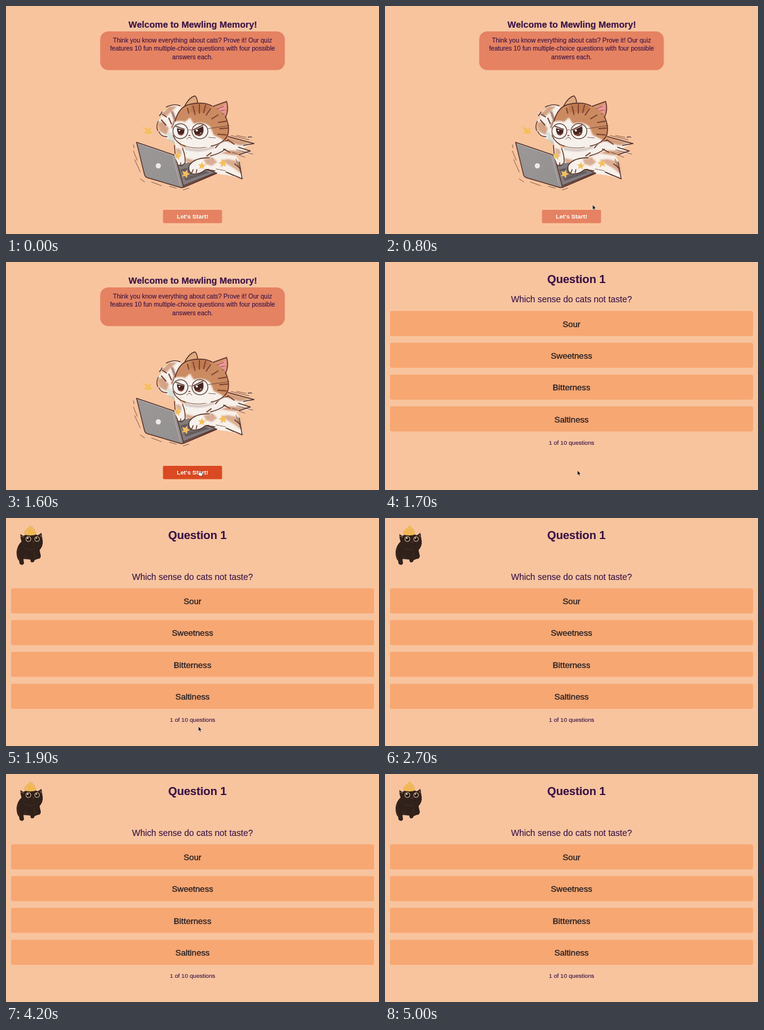
An HTML page that plays this animation: 600 px wide and 368 px high, repeating every 5.1 s.

```html
<!DOCTYPE html>
<html lang="en">
<head>
<meta charset="utf-8">
<title>Cat quiz</title>
<style>
html, body { margin: 0; width: 100%; height: 100%; overflow: hidden; background: #f8c49e; }
svg { display: block; width: 100%; height: 100%; }
text { font-family: "Liberation Sans", Arial, sans-serif; text-anchor: middle; stroke-linejoin: round; fill: #3b1547; stroke: #3b1547; stroke-width: .12; }
.bold { font-weight: 700; stroke-width: .2; }
.answer { font-size: 13.6px; fill: #262024; stroke: #262024; stroke-width: .35; }
.ink { fill: none; stroke: #5a342b; stroke-width: 1.4; stroke-linecap: round; stroke-linejoin: round; }
.thin { stroke-width: .7; }
.stripe { fill: none; stroke: #7d4632; stroke-width: 1.9; stroke-linecap: round; }
.fur { fill: #c98a65; }
.white { fill: #f8f1eb; }
.star { fill: #f5c05c; }
</style>
</head>
<body>
<svg viewBox="0 0 600 368" preserveAspectRatio="none">
<defs>
  <linearGradient id="lid" x1="0" y1="0" x2="1" y2="1">
    <stop offset="0" stop-color="#9b9897"/><stop offset="1" stop-color="#939090"/>
  </linearGradient>
  <filter id="soft"><feGaussianBlur stdDeviation="1.1"/></filter>
  <clipPath id="skull">
    <path d="M271 188Q275 165 295 158Q316 152 334 162Q354 171 358 191Q362 214 348 221Q326 232 298 229Q275 225 269 211Q266 199 271 188Z"/>
  </clipPath>
</defs>
<rect width="600" height="368" fill="#f8c49e"/>

<g id="welcome">
  <text class="bold" x="300.5" y="34.5" font-size="14.5">Welcome to Mewling Memory!</text>
  <rect x="151.5" y="41" width="297" height="62.5" rx="13" fill="#e58261"/>
  <g font-size="10.15">
    <text x="300" y="58.7">Think you know everything about cats? Prove it! Our quiz</text>
    <text x="300" y="72.2">features 10 fun multiple-choice questions with four possible</text>
    <text x="300" y="85.7">answers each.</text>
  </g>

  <g id="typist">
    <!-- raised paw -->
    <path class="white" d="M274 218Q250 214 246 202L248 192L243 187L250 180L246 173L256 168L262 161Q274 157 282 163L273 187Z"/>
    <g filter="url(#soft)">
      <path class="fur" d="M246 176L256 169L262 162L275 162L266 170L258 178ZM245 187L255 188L262 198L258 208L247 202Z" opacity=".75"/>
      <path fill="#b9cbc6" opacity=".5" d="M259 202L272 209L274 224L262 219Z"/>
      <path d="M267 170L272 184L267 197" fill="none" stroke="#8e5b48" stroke-width="3"/>
    </g>
    <path class="stripe" d="M250 184L257 192M252 175L258 179M262 181L266 190"/>
    <path class="ink" d="M246 203Q250 211 259 211M245 186Q241 194 244 201M247 177L251 171M258 163Q270 157 280 161"/>

    <!-- body and swinging arm -->
    <path class="white" d="M271 215L284 230L350 214L385 218L397 222L381 230L394 237L370 242L377 252L381 279Q352 271 337 271L291 260Q274 246 271 215Z"/>
    <g filter="url(#soft)">
      <path class="fur" d="M348 210L365 214L386 219L395 221L377 225L362 221L347 216ZM360 233L391 235L369 241L347 238L329 243Z" opacity=".8"/>
      <path class="fur" d="M287 245L308 250L327 243L334 247L313 257L293 257ZM345 249L357 247L377 251L380 272L367 262Z" opacity=".65"/>
      <path d="M288 230Q314 237 335 227" fill="none" stroke="#d3c7c2" stroke-width="4"/>
    </g>
    <path class="stripe" d="M357 216L367 223M350 231L360 236M368 255L377 262M323 242L330 237"/>
    <path class="ink" d="M350 206L355 210L384 218L399 222L382 225M374 228L393 234L375 240M337 229Q345 218 357 217M375 252L380 279L354 268M329 242Q344 238 353 231"/>
    <path class="ink thin" d="M362 209L391 216M371 232L397 239M364 236L384 244M370 247L378 270M371 209L386 212M390 211L396 212"/>

    <!-- ears and head -->
    <path d="M286 164Q294 148 303 145Q308 149 309 160Z" fill="#dfaa7f"/>
    <path d="M331 162L355 154Q359 168 353 181Z" fill="#d6936b"/>
    <path d="M336 167L354 158Q355 169 351 177Z" fill="#ee969a"/>
    <g clip-path="url(#skull)">
      <rect x="265" y="150" width="100" height="85" fill="#cb8a60"/>
      <g filter="url(#soft)">
        <path class="white" d="M262 190Q277 183 288 187L296 180L302 190Q318 185 329 195L334 208L350 216L340 236L280 236L262 215Z"/>
        <path d="M297 158Q312 153 330 163L322 172L296 171Z" fill="#bb7346" opacity=".7"/>
      </g>
    </g>
    <path class="stripe" d="M301 162L304 175M311 159L311 173M321 160L318 172M292 165L294 173M329 166L322 176M354 186L342 188M357 197L344 198M354 208L341 207M341 176L331 182"/>
    <path class="ink" d="M287 162Q295 147 304 145Q308 149 308 156M333 162L355 154Q359 168 353 180M272 186Q277 166 291 160Q315 153 331 161M353 178Q360 193 357 207Q351 222 330 226M269 209Q274 222 288 226"/>
    <path class="ink thin" d="M340 166L350 162M346 169L352 168M348 174L351 174M288 226Q304 231 321 228"/>

    <!-- face -->
    <g fill="#fff" fill-opacity=".45" stroke="#6c4f45" stroke-width="1.4">
      <ellipse cx="280.5" cy="202" rx="12" ry="12"/><ellipse cx="312" cy="202" rx="12.7" ry="12.3"/>
    </g>
    <path d="M275 197L287 200Q287 208 282 209Q275 208 275 197Z" fill="#45231f"/>
    <path d="M302 201L317 194Q320 209 310 210Q303 209 302 201Z" fill="#45231f"/>
    <path d="M277 206Q282 210 286 205M304 207Q311 210 317 204" fill="none" stroke="#85483a" stroke-width="1.8"/>
    <g fill="#fff"><circle cx="279" cy="201" r="1.3"/><circle cx="307" cy="201" r="1.7"/><circle cx="313" cy="205" r=".8"/></g>
    <path class="ink" d="M273 194L287 199M301 200L317 192"/>
    <path class="ink thin" d="M292.500 201Q295 198 299 201M325 198L359 193M291 215Q293 212 295 212Q298 212 299 215M326 212L337 213"/>
    <ellipse cx="295" cy="209" rx="1.8" ry="1.1" fill="#96504a"/>

    <!-- laptop -->
    <path d="M270 256L302 252L339 270L285 293Z" fill="#827b7c"/>
    <path d="M280 264L306 257L326 269L289 282Z" fill="#625c60"/>
    <path d="M282 271L313 261M285 277L321 266M290 261L306 273M300 258L316 269" stroke="#8c8588" stroke-width=".8"/>
    <path class="ink" d="M302 253L339 270L285 293M286 290L335 270"/>
    <path class="ink" style="fill:url(#lid)" d="M210 220L269 240Q272 241 273 244L285 290Q285 294 281 293L227 277Q224 276 223 273Z"/>
    <path d="M212 222L268 241L280 289" fill="none" stroke="#c1babb" stroke-width=".8"/>
    <circle cx="245" cy="258" r="4.2" fill="#eee9e6"/>

    <!-- typing paws -->
    <path class="white" d="M273 225Q281 228 285 238Q289 248 288 254Q284 259 278 257L271 242Z"/>
    <path class="fur" filter="url(#soft)" d="M273 229L281 231L283 239L274 241Z" opacity=".6"/>
    <path class="ink" d="M271 225L272 239M284 230Q289 242 288 253Q284 259 278 257M281 253L281 257"/>
    <path class="white" d="M329 245Q306 244 295 257Q292 267 300 271Q310 272 320 264L342 259Z"/>
    <path class="fur" filter="url(#soft)" d="M318 247L333 245L340 252L331 258L321 255Z" opacity=".65"/>
    <path class="ink" d="M327 245Q304 244 295 257Q292 267 300 271Q312 272 321 264L336 266M301 264L299 269M307 264L306 269"/>
    <path class="ink thin" d="M205 234L211 249M207 248L216 268M205 224L206 229M216 279L223 284M234 284L250 290M263 291L274 294M285 297L294 294M338 263L353 266M356 269L366 274"/>
    <path d="M389 212L395 211" stroke="#655858" stroke-width="1.5"/>
    <path class="star" d="M219 194L228 198L235 197L232 201L236 205L228 207L222 205L225 201Z"/>
    <g id="stars"></g>
  </g>

  <rect id="start" x="252.5" y="329" width="95" height="21.5" rx="2"/>
  <text class="bold" x="300" y="343.3" font-size="9.75" style="fill:#fff;stroke:none">Let's Start!</text>
</g>

<g id="quiz">
  <text class="bold" x="308" y="34.3" font-size="18.2">Question 1</text>
  <g id="kitty">
    <path d="M25 38Q18 44 17 55Q17 65 21 69L22 74Q27 78 29 73L28 66L39 67L40 71Q45 73 46 68L51 66Q56 66 56 61L54 52Q60 45 59 37L57 24L51 28Q39 21 28 29L23 26Q23 33 25 38Z" fill="#30211b"/>
    <path d="M20 49Q17 61 23 68M30 48Q37 53 47 50M45 54L47 65M32 59Q30 64 29 67" fill="none" stroke="#49352a" stroke-width=".8"/>
    <path d="M23 29L29 31M55 27L57 31" stroke="#916344" stroke-width="1.2"/>
    <g fill="#211512" stroke="#e7c79d" stroke-width="1"><circle cx="36" cy="34" r="4"/><circle cx="50" cy="34" r="3.8"/></g>
    <g fill="#fff0d8"><circle cx="35" cy="32.5" r="1.2"/><circle cx="49" cy="32.5" r="1.1"/></g>
    <path d="M43 38L45 38L44 39Z" fill="#b67973"/>
    <path d="M31 27Q28 21 33 19Q34 16 37 16Q37 13 40 13Q43 14 43 17Q47 18 46 21Q49 23 47 27Q39 29 31 27Z" fill="#f2bd58" stroke="#d99843" stroke-width=".5"/>
    <path d="M35 20Q39 22 43 19M34 24Q39 26 45 23" fill="none" stroke="#d99843" stroke-width=".5"/>
  </g>
  <g id="content">
    <text x="300" y="65.3" font-size="14">Which sense do cats not taste?</text>
    <g id="answers"></g>
    <text x="300" y="295" font-size="9.6">1 of 10 questions</text>
  </g>
</g>

<path id="arrow" d="M0 0V7.6L1.8 6L3 8.7L4.3 8.1L3.1 5.5H5.5Z" fill="#111" stroke="#fff" stroke-width=".45"/>
<path id="hand" d="M1 0Q2 0 2 1V3.4L5.5 4Q7 4.4 6.6 6L5.8 9H2L-.9 5.7Q-.8 4.5 .2 5V1Q.2 0 1 0Z" fill="#fff" stroke="#222" stroke-width=".6"/>
</svg>
<script>
const NS = "http://www.w3.org/2000/svg";
const LOOP = 5100, STEP = 100;
const HOVER = 900, OPEN = 1700, LOADED = 1900, IDLE = 2700;
const el = id => document.getElementById(id);

function add(parent, tag, attrs, text) {
  const node = document.createElementNS(NS, tag);
  for (const key in attrs) node.setAttribute(key, attrs[key]);
  if (text) node.textContent = text;
  el(parent).appendChild(node);
}

["Sour", "Sweetness", "Bitterness", "Saltiness"].forEach((label, i) => {
  const y = 79 + i * 51.35;
  add("answers", "rect", { x: 8, y, width: 584, height: 40.5, rx: 3, fill: "#f7a772" });
  add("answers", "text", { class: "answer", x: 300, y: y + 25.5 }, label);
});

function star(x, y, r, turn) {
  const points = Array.from({ length: 10 }, (_, i) => {
    const a = turn + i * Math.PI / 5, d = i % 2 ? r * .45 : r;
    return (x + d * Math.sin(a)).toFixed(1) + "," + (y - d * Math.cos(a)).toFixed(1);
  });
  add("stars", "polygon", { class: "star", points: points.join(" ") });
}
star(276, 242, 7, .2);
star(289, 271, 7.5, .35);
star(315, 258, 6.5, .1);
star(349, 254, 7.5, -.15);

// time, x, y of the pointer
const path = [[300, 564, 215], [600, 437, 270], [800, 334, 321], [1000, 317, 332], [1200, 309.5, 336.5]];

function pointer(t) {
  const i = path.findIndex(p => p[0] > t);
  if (i < 0) return path[path.length - 1].slice(1);
  const a = path[Math.max(0, i - 1)], b = path[i];
  const k = Math.max(0, (t - a[0]) / (b[0] - a[0]));
  return [a[1] + (b[1] - a[1]) * k, a[2] + (b[2] - a[2]) * k];
}

function show(id, on) {
  el(id).style.display = on ? "" : "none";
}

function draw(time) {
  const t = Math.floor(time % LOOP / STEP) * STEP;
  const hover = t >= HOVER && t < OPEN;
  show("welcome", t < OPEN);
  show("quiz", t >= OPEN);
  show("kitty", t >= LOADED);
  el("content").setAttribute("transform", `translate(0 ${t >= LOADED ? 34.4 : 0})`);
  el("start").setAttribute("fill", hover ? "#da4921" : "#e58261");

  const [x, y] = pointer(t);
  for (const id of ["arrow", "hand"]) el(id).setAttribute("transform", `translate(${x} ${y})`);
  show("hand", hover);
  show("arrow", t >= path[0][0] && t < IDLE && !hover);
}

const begin = performance.now();
function tick(now) {
  draw(Math.max(0, now - begin));
  requestAnimationFrame(tick);
}
draw(0);
requestAnimationFrame(tick);
</script>
</body>
</html>
```
